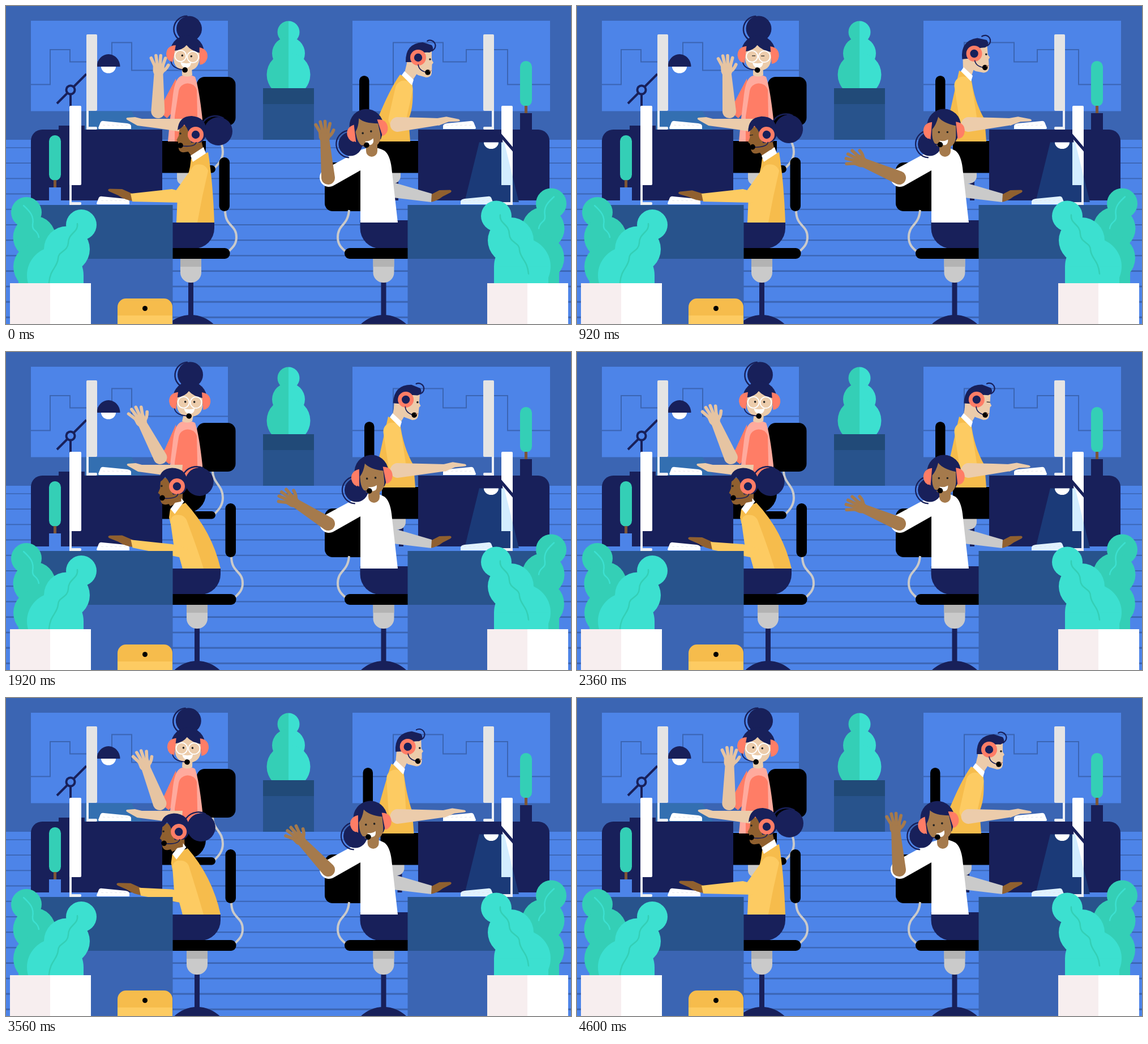
Recreate the animation shown at these times as an HTML page with a canvas. Size 998x561 px, loop 4640 ms.

```html
<!DOCTYPE html>
<html lang="en">
<head>
<meta charset="utf-8">
<title>Support team at work</title>
<style>
html, body { margin: 0; width: 100%; height: 100%; overflow: hidden; background: #3b65b3; }
canvas { display: block; }
</style>
</head>
<body>
<canvas id="stage" width="998" height="561"></canvas>
<script>
const ctx = document.getElementById('stage').getContext('2d');
const LOOP = 4640, RAD = Math.PI / 180;
const WALL = '#3b65b3', SKY = '#4d84e8', NAVY = '#18205a', DESK = '#28538c';
const TEAL = '#3ce0d0', GREEN = '#34cfb6', CORAL = '#ff7d66', PINK = '#ffaa9d';
const YELLOW = '#fdcb62', AMBER = '#f6bc4c', GREY = '#cacaca', BLACK = '#000', WHITE = '#fff';
const FAIR = '#ecccab', TAN = '#e6c4a2', BROWN = '#a57a4c', DARK = '#90602f';

// ---------- drawing helpers ----------
function fill(d, color) { ctx.fillStyle = color; ctx.fill(new Path2D(d)); }
function line(d, color, width, cap = 'butt') {
  ctx.strokeStyle = color; ctx.lineWidth = width; ctx.lineCap = cap;
  ctx.stroke(new Path2D(d));
}
function rect(x, y, x2, y2, color, radius = 0) {
  ctx.fillStyle = color;
  ctx.beginPath(); ctx.roundRect(x, y, x2 - x, y2 - y, radius); ctx.fill();
}
function disc(x, y, r, color) {
  ctx.fillStyle = color;
  ctx.beginPath(); ctx.arc(x, y, r, 0, 7); ctx.fill();
}
function ring(x, y, r, color, width, from = 0, to = 360) {
  ctx.strokeStyle = color; ctx.lineWidth = width; ctx.lineCap = 'round';
  ctx.beginPath(); ctx.arc(x, y, r, from * RAD, to * RAD); ctx.stroke();
}
function at(x, y, deg, draw, sx = 1) {
  ctx.save();
  ctx.translate(x, y); ctx.rotate(deg * RAD); ctx.scale(sx, 1);
  draw();
  ctx.restore();
}

// ---------- motion helpers (seconds) ----------
function ramp(t, from, to) {
  const p = Math.min(1, Math.max(0, (t - from) / (to - from)));
  return (1 - Math.cos(p * Math.PI)) / 2;
}
const hold = (t, inFrom, inTo, outFrom, outTo) => ramp(t, inFrom, inTo) - ramp(t, outFrom, outTo);
const wave = (t, peak, period) => Math.cos((t - peak) / period * 2 * Math.PI);
const hop = (t, peak, half) => Math.max(0, 1 - ((t - peak) / half) ** 2);

// ---------- scenery ----------
function backdrop() {
  rect(0, 0, 998, 236, WALL);
  rect(44, 26, 392, 185.5, SKY);
  rect(612, 26, 961, 185.5, SKY);
  line('M44 138.5H78V77H113V98.5H187V64.5H222V113.5H392', WALL, 2);
  line('M612 138.5H684V64.5H772V98.5H813V77H886V138.5H961', WALL, 2);
  rect(0, 236, 998, 561, SKY);
  for (let i = 0; i < 12; i++) line(`M0 ${250 + 27.2 * i}H998`, WALL, 1.6 + i * 0.12);
}
function centrePlant() {
  for (const [x, color] of [[440, GREEN], [499, TEAL]]) {
    ctx.save();
    ctx.beginPath(); ctx.rect(x, 0, 59, 145); ctx.clip();
    for (let i = 0; i < 3; i++) disc(499, 46 + 37.5 * i, 19.5 + 9.5 * i, color);
    ctx.restore();
  }
  rect(454, 145, 544, 173, '#214a78');
  rect(454, 173, 544, 236, DESK);
}
function keyboard(x, y, side, color = WHITE) {
  at(x, y, 0, () => {
    fill('M0 12L4 2Q6 -1 10 0L51 4Q58 5 58 9V14H3Q0 14 0 12Z', color);
    for (let i = 0; i < 6; i++) line(`M${8 + i * 8} 7l4 .5`, '#e3e6ee', 1);
  }, side);
}
function screen(x, y, w, h, foot, side, color) {
  at(x, y, 0, () => {
    rect(0, h - 2, 4, foot, '#eceff5');
    rect(0, foot - 5, w, foot, '#eceff5', 2);
    rect(0, 0, w, h, color, 2);
  }, side);
}
function smallPlant(x, y, potBottom, pot) {
  rect(x, y, x + 21, y + 80, GREEN, 10.5);
  rect(x + 8, y + 79, x + 13, y + 93, '#7d5637');
  rect(x, y + 92, x + 21, potBottom, pot);
}
function lampHead(x, y) {
  fill(`M${x - 20.5} ${y}a20.5 22 0 0 1 41 0Z`, NAVY);
  fill(`M${x - 13} ${y}a13 11.5 0 0 0 26 0Z`, WHITE);
}
function backDesks() {
  line('M90 172L142 120M114 148V212', NAVY, 4);
  disc(114, 148, 9.5, NAVY); disc(114, 148, 5.5, SKY);
  lampHead(181, 107);
  fill('M140 185.5H222L240 218H140Z', '#336fb1');
  rect(93, 211, 139, 219, NAVY);
  rect(44, 218, 276, 343, NAVY, [20, 0, 0, 0]);
  rect(728, 218, 960, 343, NAVY, [0, 20, 0, 0]);
  smallPlant(908, 97, 220, NAVY);
  screen(142, 50, 19, 135, 168, 1, '#e4e4e4');
  screen(862, 50, 19, 135, 168, -1, '#e4e4e4');
  keyboard(163, 203, 1);
  keyboard(830, 203, -1);
}
function frontScreens() {
  const beam = 'M836 240H880L906 346H810Z';
  smallPlant(76, 228, 343, SKY);
  screen(112, 176, 21, 140, 175, 1, WHITE);
  fill(beam, '#1b3a78');
  screen(895, 176, 20, 140, 175, -1, WHITE);
  ctx.save();
  ctx.clip(new Path2D('M875 176H895V316H875Z'));
  fill(beam, '#d3edff');
  ctx.restore();
  lampHead(857, 240.5);
  line('M873 227L897 255', NAVY, 5);
  keyboard(160, 336, 1);
  keyboard(861, 336, -1, '#e0f2ff');
}
function frontDesk(x, x2) {
  rect(x, 351, x2, 446, DESK);
  rect(x, 446, x2, 561, WALL);
}
function leafyPlant() {
  disc(36, 364, 27, GREEN); disc(50, 408, 37.5, GREEN); disc(54, 460, 41, GREEN);
  rect(22, 475, 90, 510, GREEN);
  line('M31 352C42 362 50 370 47 386C46 398 56 394 58 408', TEAL, 2.5, 'round');
  disc(133, 386, 27, TEAL); disc(107.5, 429, 40.5, TEAL); disc(87, 475, 50, TEAL);
  rect(41, 475, 137, 510, TEAL);
  line('M126 384C128 400 110 400 110 418C109 434 92 432 92 446C90 462 78 464 76 488', GREEN, 2.5, 'round');
}
function planters() {
  leafyPlant();
  at(999, -15.5, 0, leafyPlant, -1);
  for (const x of [7, 850]) {
    rect(x, 489, x + 71, 561, '#f7eeef');
    rect(x + 71, 489, x + 143, 561, WHITE);
  }
}
function bag() {
  rect(197, 516, 294, 590, AMBER, 15);
  rect(197, 546, 294, 561, YELLOW);
  disc(245.5, 533.5, 4.5, BLACK);
}

// ---------- shared body parts ----------
function chairLeg(x, dy) {
  rect(x - 4.5, 486 + dy, x + 4.5, 550, NAVY);
  disc(x, 603, 58, NAVY);
  rect(x - 18.5, 440 + dy, x + 18.5, 488 + dy, GREY, [0, 0, 18, 18]);
  rect(x - 18.5, 446 + dy, x + 18.5, 460 + dy, '#b3b3b3');
}
function wavingArm(x, y, deg, color, length) {
  at(x, y, deg, () => {
    fill(`M-12 0A12 12 0 0 0 12 0L8 ${10 - length}H-8Z`, color);
    ctx.translate(0, -length);
    fill('M-10 -6Q0 -12 10 -6L10 5Q8 14 0 16Q-8 14 -10 5Z', color);
    for (let i = -1.5; i < 2; i++) line(`M${i * 4.6} -4L${i * 8.4 - 1} ${-23 + i * i * 2.2}`, color, 5.6, 'round');
    line('M5 6Q12 4 17 -6', color, 5.6, 'round');
  });
}
function typingHand(x, y, deg, color, side) {
  at(x, y, deg, () => fill('M0 -6L-18 -14L-40 -14.5Q-45 -13 -41 -10L-25 -3Q-12 6 2 7Z', color), side);
}
function earCups() {
  for (const s of [-1, 1]) at(0, 0, 0, () => fill('M21 -15Q37 -13 36.5 2Q35 14 24 15.5Z', CORAL), s);
}
function sideEarphone() {
  disc(0, 0, 14, CORAL); disc(0, 0, 7.2, NAVY);
}
function mic(boom, x, y) {
  line(boom, NAVY, 1.7);
  disc(x, y, 4.8, BLACK);
}
function eye(x, y, closed) {
  if (closed) line(`M${x - 3} ${y}h6`, '#222', 1.3);
  else disc(x, y, 1.8, '#222');
}

// ---------- people ----------
function glassesWoman(t) {
  rect(337, 125, 405.5, 211, BLACK, 14);
  line('M365 211C366 232 383 235 383 257C383 272 374 280 366 288', GREY, 4);
  rect(302, 290, 334, 316, GREY, [0, 0, 12, 12]);
  rect(276, 238, 353, 284, BLACK, [0, 0, 34, 0]);
  rect(276, 281, 370, 294.5, BLACK, [0, 7, 7, 0]);

  const out = hold(t, .7, 1.5, 4, 4.6), sway = wave(t, 3.08, 3);
  const swing = 1 - out * (25 - 5 * sway), elbow = 268.5 - swing * .14;
  fill(`M300 128L${elbow + 8} 172L${elbow - 3} 182L${elbow + 16} 198L308 172Z`, CORAL);
  wavingArm(elbow, 186, swing, TAN, 76);
  fill('M308 124Q320 118 334 125Q341 145 347 200V239H286Q290 195 294 165Q297 130 308 124Z', PINK);
  fill('M305 150A16.5 16.5 0 0 1 337 148L339 239H298V195Z', CORAL);
  const tap = Math.sin(t * 7) * 1.5;
  fill(`M312 199L240 199L${228 + tap} 196L${214 + tap} 197Q${210 + tap} 199 ${216 + tap} 202L${232 + tap} 211L270 216L310 222Z`, FAIR);

  const x = 319.5 + out * (3.3 - 2.5 * sway);
  fill(`M${x - 9} 102H${x + 8}L329 122Q320 127 311 122Z`, FAIR);
  at(x, 86, 5 - 4 * hold(t, .1, .9, 4, 4.6), () => {
    disc(0, -46, 22.5, NAVY);
    ring(-4, -45, 23, NAVY, 2.5, 95, 265);
    fill('M-30 0V-4A30 30 0 0 1 30 -4V0L22 8H-22Z', NAVY);
    fill('M-23 -5Q-8 -8 -2 -17Q6 -8 23 -5V6Q22 28 0 28Q-22 28 -23 6Z', FAIR);
    earCups();
    const shut = hop(t, .92, .1) + hop(t, 3.08, .1) + hop(t, 4, .1) > 0;
    for (const s of [-1, 1]) {
      eye(s * 8, 2, shut);
      ring(s * 11, 3, 10, WHITE, 1.8);
    }
    fill('M-10 14Q0 17 9 13Q8 23 0 23Q-8 23 -10 14Z', WHITE);
    mic('M-27 14Q-24 27 0 27', -1, 27);
  });
}

function man(t) {
  const upright = hold(t, .2, .85, 3.35, 3.95), lean = 1 - upright;
  const hip = 9 * upright, nx = 709 - 21 * upright, ny = 125 - 7 * upright;
  rect(624 + hip, 123, 641.5 + hip, 225, BLACK, 9);
  rect(685 + hip, 305, 693 + hip, 343, NAVY);
  rect(664 + hip, 290, 697 + hip, 313, GREY, [0, 0, 13, 13]);
  rect(655 + hip, 238, 728, 294.5, BLACK, [0, 0, 0, 12]);

  fill(`M656 239V200Q${(nx + 648) / 2} 145 ${nx - 13} ${ny - 4}L${nx + 8} ${ny + 6}
    Q${nx + 13} ${ny + 50} ${711 + hip} 200L${714 + hip} 239Z`, AMBER);
  const reach = wave(t, 1.6, LOOP / 2000), wrist = 768 + 11 * reach, lift = -2 * reach;
  line(`M${nx - 6} ${ny + 22}L691 200`, YELLOW, 31, 'round');
  fill(`M691 196A13 13 0 0 0 692 222L${wrist + 3} 210L${wrist} 198L735 197Z`, FAIR);
  fill(`M${wrist - 2} 198L${wrist + 14} ${195 + lift / 2}L${wrist + 36} ${199 + lift}q5 3 -2 4L${wrist + 18} ${204 + lift / 2}L${wrist} 211Z`, FAIR);

  const nod = wave(t, 2.1, 2.2) * upright, x = 704 + 24 * lean + 2.5 * nod, y = 84 + 7 * lean;
  fill(`M${x - 20} ${y + 10}L${nx - 6} ${ny - 3}L${nx + 8} ${ny + 8}L${x} ${y + 25}Z`, FAIR);
  fill(`M${nx - 5} ${ny - 10}l16 15l-3 10l-18 -18Z`, WHITE);
  at(x, y, 5 * nod, () => {
    fill('M-20 -4L24 -16V4L27 9L24.5 12L24 27Q23 35 14 35L0 31L-20 18Z', FAIR);
    fill('M-22 8Q-23 -25 8 -27L24 -22Q30 -13 20 -9Q6 -10 4 -5L-4 8Z', NAVY);
    ring(21, -21, 9.5, NAVY, 2.2, 240, 430);
    sideEarphone();
    eye(21, 3, hop(t, 2.36, .1) > 0);
    mic('M0 12Q1 23 15 26', 17, 26);
    line('M19 24L24 23', '#b87964', 1.2);
  });
}

function bunWoman(t) {
  const lean = hold(t, 1.1, 1.75, 3.4, 4.2);
  const hip = 11 * hold(t, 1.4, 1.9, 3.75, 4.35), dip = 3 * (hop(t, 1.52, .3) + hop(t, 4, .3));
  chairLeg(326.5 + hip, dip);
  at(hip, dip, 0, () => {
    line('M387 360C387 390 407 385 407 408C407 422 398 428 392 434', GREY, 4);
    rect(376.5, 267, 395, 362, BLACK, 9);
    rect(270, 382, 368, 428, NAVY, [0, 0, 36, 0]);
    rect(270, 427, 395.5, 446, BLACK, 9);
  });

  const nx = 340 - 37 * lean, ny = 262 + 8 * lean;
  const base = 382 + dip, front = 301 + hip, back = 368 + hip, nape = nx + 17 - 3 * lean;
  fill(`M${front} ${base}L${nx - 15} ${ny + 22}L${nx - 13} ${ny + 7}L${nape} ${ny - 4}
    Q${nape + (back - nape) * .75} ${ny + 46} ${back} ${base}Z`, AMBER);
  const sx = nx + 2, sy = ny + 29, ex = 309, ey = 335 + 16 * lean;
  fill(`M${front} ${base}L${ex - 6} ${ey}L${sx - 15} ${sy}A15.5 15.5 0 0 1 ${sx + 15} ${sy}
    Q${sx + 4 + lean * 28} ${sy + 45} ${front + 37} ${base}Z`, YELLOW);
  line(`M${sx - 3} ${sy}L${ex} ${ey - 2}`, YELLOW, 23, 'round');

  const slide = hold(t, 1.8, 2.3, 4, 4.4) * (1 + wave(t, 2.36, 1.3)) / 2;
  const wx = 223 + 16 * slide, wy = 337 + 4 * slide;
  typingHand(wx, wy, -8 * hop(t, 1.2, .8) - 16 * hop(t, 4, .4), DARK, 1);
  fill(`M${wx - 3} ${wy - 6}L${ex - 16} ${ey - 12}L${ex + 8} ${ey - 6}L${ex + 2} ${ey + 12}L${wx} ${wy + 8}Z`, YELLOW);

  const x = 335 - 33 * lean, y = 227 + 10 * lean + 2 * dip;
  fill(`M${x - 22} ${y + 18}L${nx - 13} ${ny + 2}L${nx + 9} ${ny - 8}L${x + 10} ${y + 10}Z`, DARK);
  at(nx, ny, -20 * lean, () => fill('M-14 2L9 -13L13 -2L-10 13Z', WHITE));
  at(x, y, -3 * lean - 15 * hop(t, 1.35, .55) - 3 * hop(t, 4, .4), () => {
    disc(40, -6, 25, NAVY);
    ring(35, -6, 27, NAVY, 2.5, 175, 300);
    fill('M-28 -16L-30 2L-34 10L-31 13L-30 25Q-28 32 -20 31L6 27L10 -15Z', DARK);
    fill('M-32 -8Q-30 -33 -7 -33Q19 -31 19 -5Q19 8 8 14L-8 14Q-11 -8 -20 -18Q-25 -11 -32 -8Z', NAVY);
    sideEarphone();
    eye(-27, -2, hop(t, .92, .1) > 0);
    mic('M1 13Q0 22 -24 20', -27, 19);
  });
}

function whiteWoman(t) {
  chairLeg(667, 0);
  rect(563, 276, 650, 362, BLACK, 14);
  line('M606 360C604 388 586 385 586 408C586 422 594 428 602 435', GREY, 4);
  rect(625.5, 378, 720, 428, NAVY, [0, 0, 0, 36]);
  rect(598, 427, 720, 446, BLACK, 9);
  typingHand(750, 339, 0, DARK, -.86);
  fill('M680 310L752 331L751 346L684 338Z', GREY);

  const out = hold(t, .2, .92, 3.2, 4.1), beat = wave(t, .92, 1.44) * out;
  fill('M626 254Q650 245 668 255Q678 262 681 285L692 382H626V290L580 316A16 16 0 0 1 561 289Z', WHITE);
  wavingArm(569, 303, -5 - 55 * out - 7 * beat, BROWN, 77);

  const x = 638.3 + 8.5 * out + 1.5 * beat, tilt = -12.5 + 8 * out + 4 * beat;
  const px = x - 25 + tilt * .4;
  disc(px, 243.5, 21, NAVY);
  ring(px - 1, 243.5, 24, NAVY, 2.3, 95, 270);
  const throat = 646 + 4 * out;
  rect(throat - 10, 236, throat + 10, 266, BROWN, 10);
  at(x, 219.5, tilt, () => {
    fill('M-30 2V-8A30 30 0 0 1 30 -8V2L20 20L-22 26Z', NAVY);
    fill('M-21 -2Q-14 -9 -10 -24Q-2 -13 21 -8V10Q20 31 1 31Q-20 30 -21 8Z', BROWN);
    earCups();
    eye(-9, 3); eye(6, 3);
    fill('M-8 18Q0 20 7 16Q7 26 0 26Q-6 26 -8 18Z', WHITE);
    mic('M-27 14Q-24 25 -8 25', -7, 25);
  });
}

function render() {
  const t = (performance.now() % LOOP) / 1000;
  backdrop();
  centrePlant();
  backDesks();
  glassesWoman(t);
  man(t);
  frontScreens();
  bunWoman(t);
  whiteWoman(t);
  frontDesk(44, 294.5);
  frontDesk(709.5, 954);
  bag();
  planters();
  requestAnimationFrame(render);
}
render();
</script>
</body>
</html>
```
